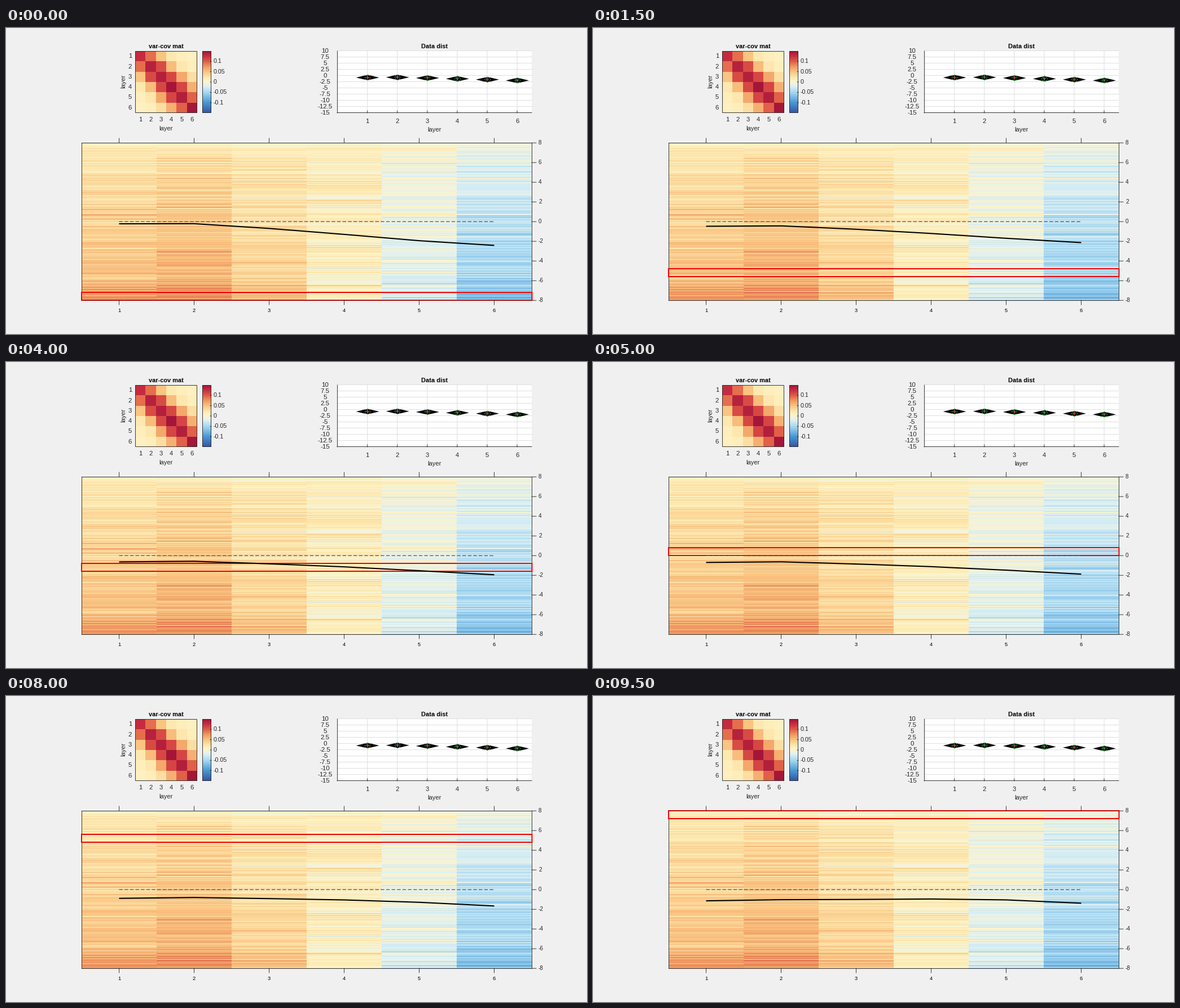
Recreate the animation shown at these times as a matplotlib script. Size 1030 px wide and 544 px high, loop 10 s.

```python
import math
import numpy as np
import matplotlib.pyplot as plt
from matplotlib.animation import FuncAnimation
from matplotlib.colors import LinearSegmentedColormap
from matplotlib.patches import Rectangle

W, H, DPI = 1030, 544, 100
PT = 72 / DPI  # points per pixel
STEPS, INTERVAL = 20, 500
INK = "#262626"

plt.rcParams["font.family"] = "Liberation Sans"
plt.rcParams["path.snap"] = False
fig = plt.figure(figsize=(W / DPI, H / DPI), dpi=DPI, facecolor="#f0f0f0")
ax = fig.add_axes([0, 0, 1, 1])
ax.set_axis_off()

heat = LinearSegmentedColormap.from_list("heat", [
    (0.00, "#3456a4"), (0.17, "#4a9ad6"), (0.33, "#a6d8f2"), (0.43, "#def0f4"),
    (0.48, "#f3f4dc"), (0.52, "#fff3c4"), (0.58, "#fde6ac"), (0.67, "#fac380"),
    (0.75, "#f19a60"), (0.84, "#e05a45"), (0.92, "#c92f42"), (1.00, "#a41539")])


def line(xs, ys, color=INK, lw=0.9, z=6, **kw):
    return ax.plot(xs, ys, color=color, lw=lw * PT, zorder=z, **kw)[0]


def label(x, y, s, size=11.3, color=INK, ha="center", va="center", **kw):
    ax.text(x, y, s, fontsize=size * PT, color=color, ha=ha, va=va, zorder=9, **kw)


def image(data, box, vmax):
    x0, y0, x1, y1 = box
    ax.imshow(data, cmap=heat, vmin=-vmax, vmax=vmax, extent=(x0, x1, y1, y0),
              interpolation="nearest", aspect="auto", zorder=2)


def frame(x0, y0, x1, y1, z=6):
    """One-pixel outline along the inner edge of the box."""
    ax.add_patch(Rectangle((x0 + .5, y0 + .5), x1 - x0 - 1, y1 - y0 - 1,
                           fill=False, ec=INK, lw=0.9 * PT, zorder=z))


def covariance_panel():
    x0, y0, size = 229, 41, 110
    cell = size / 6
    bands = [[.128, .138, .139, .149, .140, .148],
             [.093, .110, .112, .113, .099],
             [.050, .054, .066, .062],
             [.021, .022, .030],
             [.012, .012],
             [.009]]
    cov = np.diag(bands[0])
    for k, band in enumerate(bands[1:], 1):
        cov += np.diag(band, k) + np.diag(band, -k)
    image(cov, (x0, y0, x0 + size, y0 + size), 0.15)
    frame(x0, y0, x0 + size, y0 + size)
    for k in range(6):
        c = (k + .5) * cell
        label(220, y0 + c, k + 1)
        label(x0 + c, 163, k + 1)
    label(283.5, 178.5, "layer")
    label(208.5, 95, "layer", rotation=90)
    label(283.5, 36.5, "var-cov mat", 11, "black", va="baseline", weight="bold")

    image(np.linspace(.15, -.15, 110)[:, None], (348, y0, 364, y0 + size), 0.15)
    frame(348, y0, 364, y0 + size)
    for v in (.1, .05, 0, -.05, -.1):
        y = 96 - v * 367
        label(368, y, f"{v:g}", 10.6, ha="left")
        line([362, 364], [y, y])


def violin_panel():
    x0, x1, y0, y1 = 587, 932, 41, 151
    ax.add_patch(Rectangle((x0, y0), x1 - x0, y1 - y0, color="white", lw=0, zorder=1))
    for k in range(11):
        y = y0 + 11 * k - .5
        line([x0, x1], [y, y], "#dfdfdf", 1, 2)
        label(565.5, y + .5, f"{10 - 2.5 * k:g}", 11.5)
    line([x0 + .5] * 2, [y0, y1])
    line([x0, x1], [y1 - .5] * 2)

    spread, rise = np.array([0, 7, 20.5, 7, 0]), np.array([-4.6, -3.2, 0, 3.2, 4.6])
    ring = np.arange(8) * math.pi / 4
    for k, yc in enumerate((87.6, 87.2, 88.4, 89.8, 91.2, 92.8)):
        xc = x0 + 53.1 * (k + 1) + .5
        line([xc, xc], [y0, y1], "#dfdfdf", 1, 2)
        line([xc, xc], [y1 - 4, y1])
        label(xc, 166, k + 1)
        ax.fill_betweenx(yc + rise, xc - spread, xc + spread, color="black",
                         lw=0, zorder=3)
        ax.scatter(xc + 4.6 * np.sin(ring), yc + 4.6 * np.cos(ring), s=1.7,
                   color="#18b428", lw=0, zorder=4)
        line([xc, xc], [yc - 3, yc + 3], "#8a8a8a", 1, 4)
        line([xc - 2.5, xc + 2.5], [yc, yc], "#8a8a8a", 1, 4)
        red = k % 2 == 0
        ax.scatter(xc, yc, s=6 if red else 2, lw=0, zorder=5,
                   color="#e02020" if red else "#a07070")
    label(759.5, 181, "layer")
    label(760, 36.5, "Data dist", 11, "black", va="baseline", weight="bold")


def trial_values(rows=280):
    """Six layers of noisy trials, stronger towards the bottom."""
    rng = np.random.default_rng(8)
    t = np.linspace(0, 1, rows)[:, None]
    top = np.array([.14, .17, .11, .10, .00, -.10])
    bottom = np.array([.37, .44, .28, .07, -.12, -.36])
    tail = np.array([.11, .09, .09, .00, -.09, -.17])
    noise = rng.normal(size=(rows, 6))
    for k in range(1, 6):
        noise[:, k] = .5 * noise[:, k - 1] + .866 * noise[:, k]
    fade = 1 - .7 * np.exp(-t * 28)
    return fade * (top + (bottom - top) * t + tail * t ** 12 + .085 * noise)


def trial_panel():
    x0, x1, y0, y1 = 134, 932, 204, 484
    image(trial_values(), (x0, y0, x1, y1), 1)
    frame(x0, y0, x1 + 1, y1 + 1, 2.5)
    for y in (y0 + .5, y1 + .5):
        line([x0, x1], [y, y], alpha=.6)
    for k in range(6):
        x = LAYER_X[k]
        line([x, x], [y0 - 8, y0])
        line([x, x], [y1, y1 + 8])
        label(x, 502.5, k + 1, 9.4, "black")
    for v in range(-8, 9, 2):
        y = ZERO - 17.5 * v
        line([x1, x1 + 8], [y, y])
        label(944, y, v, 10, ha="left")
    line([LAYER_X[0], LAYER_X[-1]], [ZERO, ZERO], "#606060", 1.4, 4,
         dashes=(4.6, 2.3), dash_capstyle="butt")


def bin_scores(n, sub=200):
    """Mean normal score within each of n equal quantile bins."""
    z = np.linspace(-4, 4, 1601)
    cdf = [.5 + .5 * math.erf(v / math.sqrt(2)) for v in z]
    p = (np.arange(n * sub) + .5) / (n * sub)
    return np.interp(p, cdf, z).reshape(n, sub).mean(axis=1)


LAYER_X = 200.5 + 133 * np.arange(6)
ZERO = 344.2
MEAN = np.array([356.1, 355.0, 359.0, 363.9, 370.3, 377.4])
SLOPE = np.array([3.9, 3.45, 1.3, -1.45, -3.8, -4.4])
SCORES = bin_scores(STEPS)

covariance_panel()
violin_panel()
trial_panel()
window = Rectangle((134, 470), 798.5, 14, fill=False, ec="#f00000",
                   lw=2 * PT, zorder=3, joinstyle="miter")
ax.add_patch(window)
curve = line(LAYER_X, MEAN, "black", 2.1, 5, solid_capstyle="butt")
ax.set(xlim=(0, W), ylim=(H, 0))


def draw(i):
    window.set_y(470 - 14 * i)
    curve.set_ydata(MEAN + SLOPE * SCORES[i])
    return window, curve


anim = FuncAnimation(fig, draw, frames=STEPS, interval=INTERVAL, repeat=True)
plt.show()
```
